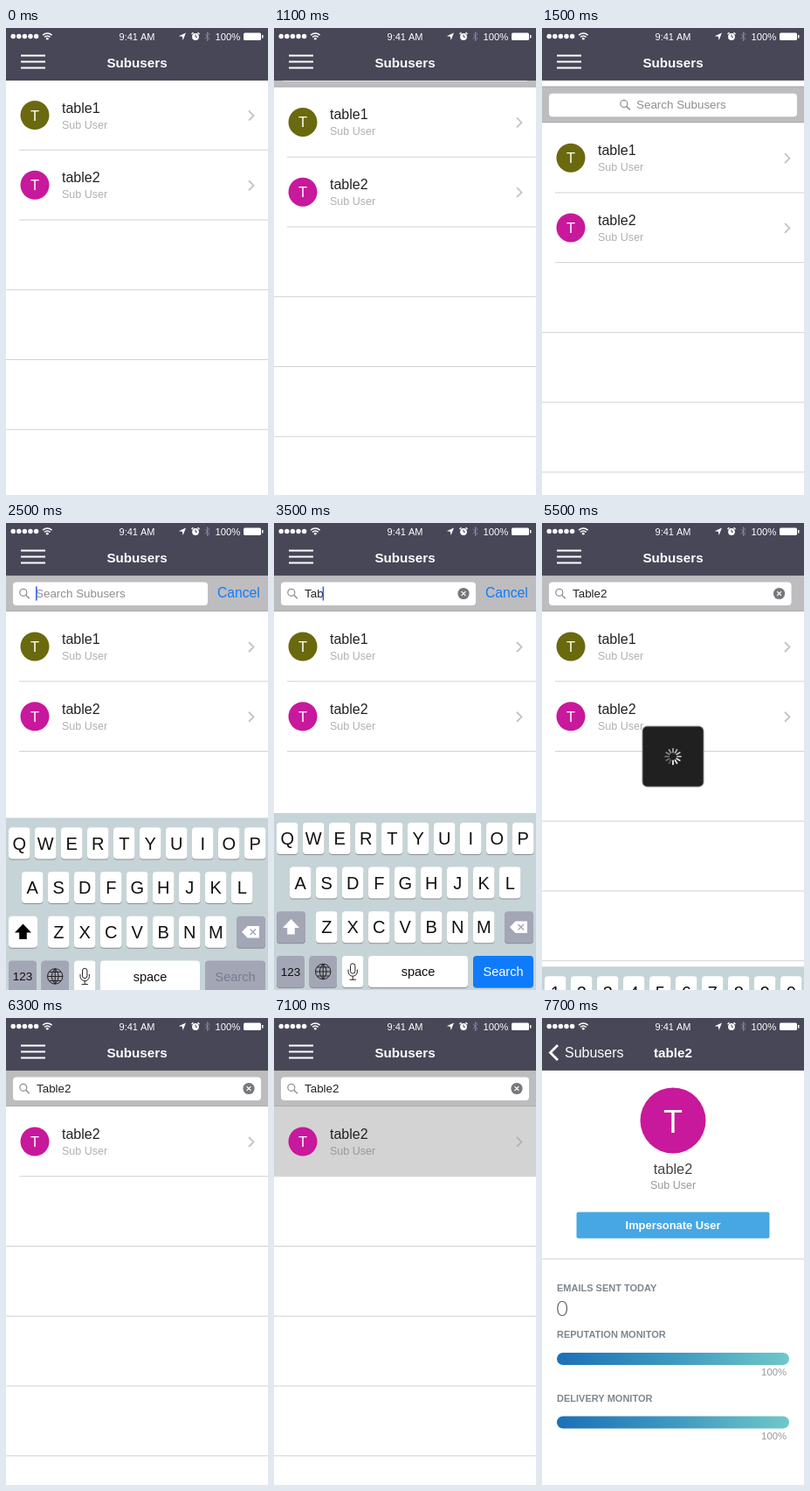
Recreate the animation shown at these times as an HTML page with a canvas. Size 300 px wide and 533 px high, loop 8000 ms.

```html
<!DOCTYPE html>
<html lang="en">
<head>
<meta charset="utf-8">
<title>Subuser search</title>
<style>
html, body { margin: 0; width: 100%; height: 100%; overflow: hidden; background: #fff; }
canvas { display: block; width: 300px; height: 533px; }
</style>
</head>
<body>
<canvas id="stage"></canvas>
<script>
const W = 300, H = 533, LOOP = 8000;
const NAV_H = 59.5, BAR_H = 41.5, ROW_H = 79.75;
const SANS = '"Liberation Sans", Arial, sans-serif';
const NAV = '#474758', BLUE = '#0f7bfb', PINK = '#c8189c', OLIVE = '#6a690e';
const GREY_KEY = '#a3a6b5', MUTED = '#8e8e93';
const USERS = [
  { name: 'table1', color: OLIVE },
  { name: 'table2', color: PINK }
];
const QUERY = 'Table2';
const PRESSES = [['T', 2900], ['A', 3100], ['B', 3300], ['L', 3600], ['E', 3900], ['2', 4650]]
  .map(([key, at]) => ({ key, at, end: at + (key === '2' ? 140 : 100) }));
const LETTERS = ['QWERTYUIOP', 'ASDFGHJKL', 'ZXCVBNM'];
const SYMBOLS = ['1234567890', '-/:;()$&@”', '.,?!’'];

const canvas = document.getElementById('stage');
const c = canvas.getContext('2d');
const ratio = window.devicePixelRatio || 1;
canvas.width = W * ratio;
canvas.height = H * ratio;

const progress = (t, start, length) => Math.min(1, Math.max(0, (t - start) / length));
const easeOut = x => 1 - (1 - x) ** 3;
const smooth = x => x * x * (3 - 2 * x);
const mix = (a, b, x) => a + (b - a) * x;

function text(str, x, y, size, color, align = 'left', weight = 'normal', family = SANS) {
  c.font = `${weight} ${size}px ${family}`;
  c.fillStyle = color;
  c.textAlign = align;
  c.fillText(str, x, y);
}
function rect(x, y, w, h, color) {
  c.fillStyle = color;
  c.fillRect(x, y, w, h);
}
function round(x, y, w, h, r, color) {
  c.beginPath();
  c.roundRect(x, y, w, h, r);
  c.fillStyle = color;
  c.fill();
}
function disc(x, y, r, color) {
  c.beginPath();
  c.arc(x, y, r, 0, 7);
  c.fillStyle = color;
  c.fill();
}
function stroke(path, color, width, cap = 'butt') {
  c.strokeStyle = color;
  c.lineWidth = width;
  c.lineCap = cap;
  c.stroke(new Path2D(path));
}
function group(x, y, alpha, draw) {
  c.save();
  c.translate(x, y);
  c.globalAlpha *= alpha;
  draw();
  c.restore();
}

function statusBar() {
  for (let i = 0; i < 5; i++) disc(8.2 + i * 6.6, 9.5, 2.7, '#fff');
  stroke('M42 8.2Q47.3 3.8 52.6 8.2M44 10.3Q47.3 7.6 50.6 10.3', '#fff', 1.5);
  disc(47.3, 12.2, 1.4, '#fff');
  text('9:41 AM', 150, 13.5, 11, '#fff', 'center');
  c.fillStyle = '#fff';
  c.fill(new Path2D('M206 5.5L202.6 14L201.8 9.8L197.8 9.2Z'));
  disc(217, 10, 3.9, '#fff');
  stroke('M217 7.5V10.2H219', NAV, 1);
  stroke('M212.5 7L214.5 5.2M221.5 7L219.5 5.2', '#fff', 1.4);
  stroke('M227.8 7L233 12.2L230.5 14.7V4.7L233 7.2L227.8 12.4', '#85859a', 1);
  text('100%', 239.5, 13.5, 11.3, '#fff');
  round(272, 5.5, 20, 8.5, 1.5, '#fff');
  rect(293, 8, 1.5, 3.5, '#fff');
}

function navBar(push) {
  rect(0, 0, W, NAV_H, NAV);
  rect(0, NAV_H - 0.5, W, 0.7, '#34343f');
  statusBar();
  group(0, 0, 1 - push, () => {
    for (const y of [31.5, 38.5, 45.5]) rect(17, y - 1, 28, 2, '#fff');
    text('Subusers', 150 - 90 * push, 45, 15.2, '#fff', 'center', 'bold');
  });
  group(0, 0, push, () => {
    stroke('M18 31L9.5 39.5L18 48', '#fff', 2.8);
    text('Subusers', mix(116, 26, push), 45, 16, '#fff');
    text(USERS[1].name, mix(270, 150, push), 45, 15.2, '#fff', 'center', 'bold');
  });
}

function userRow(user, y, selected) {
  if (selected) rect(0, y, W, ROW_H, '#d3d3d3');
  disc(33, y + 40, 16.5, user.color);
  text('T', 33, y + 46, 16.5, '#fff', 'center');
  text(user.name, 64, y + 37, 16, '#222');
  text('Sub User', 64, y + 55, 12.5, selected ? '#999' : '#b0b0b0');
  group(0, y, 1, () => stroke('M278 35L283.5 40.5L278 46', selected ? '#b4b4b8' : '#c3c3c8', 1.8));
}

function list(users, top, selected) {
  users.forEach((user, i) => userRow(user, top + i * ROW_H, selected));
  for (let i = 1; i < 7; i++) {
    const x = i <= users.length && !selected ? 15 : 0;
    rect(x, top + i * ROW_H - 0.5, W - x, 1, '#d2d2d4');
  }
}

function searchBar(t, y) {
  const enter = easeOut(progress(t, 2200, 300));
  const leave = easeOut(progress(t, 5290, 400));
  const active = enter * (1 - leave);
  const right = mix(292, 231, active);
  const typed = QUERY.slice(0, PRESSES.filter(p => t >= p.end).length);
  const shift = mix(74, 0, enter);

  rect(0, y, W, BAR_H, '#bdbdc0');
  rect(0, y, W, 1, '#adadb1');
  rect(0, y + BAR_H - 1, W, 1, '#adadb1');
  round(8, y + 8, right - 8, 26.5, 4, '#fff');
  group(shift, y, 1, () => {
    c.beginPath();
    c.arc(19.8, 19.8, 4, 0, 7);
    c.strokeStyle = MUTED;
    c.lineWidth = 1.2;
    c.stroke();
    stroke('M22.7 22.7L26.8 26.8', MUTED, 1.5);
    if (typed) text(typed, 35, 25.5, 13.4, '#222');
    else text('Search Subusers', 34, 25.5, 13.4, MUTED);
  });
  if (t > 2400 && t < 5290) {
    c.font = `13.4px ${SANS}`;
    rect(34 + c.measureText(typed).width, y + 13, 1.6, 16, '#3a63e8');
  }
  if (typed) {
    disc(right - 14, y + 21, 6.6, '#77777c');
    group(right - 14, y + 21, 1, () => stroke('M-2.4 -2.4L2.4 2.4M2.4 -2.4L-2.4 2.4', '#fff', 1.3));
  }
  if (active > 0) {
    group(80 * (1 - active), y, active, () => text('Cancel', 242, 25, 15.7, BLUE));
  }
}

function keyCap(x, y, w, color = '#fff') {
  round(x, y + 1, w, 36, 4, '#888d94');
  round(x, y, w, 36, 4, color);
}
function labelKey(label, x, y, w, size, color, ink = '#111') {
  keyCap(x, y, w, color);
  text(label, x + w / 2, y + 18 + size * 0.36, size, ink, 'center');
}

function popup(label, x, y) {
  const shape = new Path2D(`M${x - 17} ${y - 60}h34q8 0 8 8v28c0 12 -13 14 -13 26v30q0 4 -4 4h-16
    q-4 0 -4 -4v-30c0 -12 -13 -14 -13 -26v-28q0 -8 8 -8z`);
  c.save();
  c.shadowColor = 'rgba(0,0,0,.4)';
  c.shadowBlur = 3 * ratio;
  c.fillStyle = '#fff';
  c.fill(shape);
  c.restore();
  text(label, x, y - 21, 31, '#111', 'center');
}

function keyboard(t) {
  const rise = easeOut(progress(t, 2200, 430)) * (1 - easeOut(progress(t, 5290, 430)));
  if (!rise) return;
  const numeric = t >= 4200;
  const hasText = t >= PRESSES[0].end;
  const pressed = PRESSES.find(p => t >= p.at && t < p.end);
  const rows = numeric ? SYMBOLS : LETTERS;
  let pop = null;

  group(0, H - 202 * rise, 1, () => {
    rect(0, 0, W, 203, '#c6d4d7');
    rows.forEach((row, r) => {
      const wide = numeric && r === 2;
      const pitch = wide ? 42 : 30, width = wide ? 36 : 24.5;
      const left = r === 2 ? 48 : row.length === 9 ? 18 : 3;
      const y = 11 + r * 50.6;
      [...row].forEach((label, i) => {
        const x = left + i * pitch;
        labelKey(label, x, y, width, 20);
        if (pressed && pressed.key === label) pop = [label, x + width / 2, y];
      });
    });

    const y3 = 112.2, y4 = 163;
    if (numeric) labelKey('#+=', 3, y3, 33, 12, GREY_KEY);
    else {
      keyCap(3, y3, 33, hasText ? GREY_KEY : '#fff');
      c.fillStyle = hasText ? '#fff' : '#000';
      c.fill(new Path2D('M19.5 121L29 131H23.8V138.5H15.2V131H10Z'));
    }
    keyCap(264, y3, 33, GREY_KEY);
    c.fillStyle = '#fff';
    c.fill(new Path2D('M270 130.2L276.5 123.5H290V137H276.5Z'));
    stroke('M279.5 127L286 133.5M286 127L279.5 133.5', GREY_KEY, 1.4);

    labelKey(numeric ? 'ABC' : '123', 3, y4, 32, 13.5, GREY_KEY);
    keyCap(40.5, y4, 31.5, GREY_KEY);
    stroke('M47.5 181a8.7 8.7 0 1 0 17.4 0a8.7 8.7 0 1 0 -17.4 0H65M56.2 172.3V189.7M56.2 172.3q-8 8.7 0 17.4' +
      'q8 -8.7 0 -17.4M49.5 176h13.4M49.5 186h13.4', '#222', 1);
    keyCap(78, y4, 24.5);
    stroke('M87.5 174.5a2.7 2.7 0 0 1 5.4 0v6a2.7 2.7 0 0 1 -5.4 0zM85 178.5v2.5a5.2 5.2 0 0 0 10.4 0v-2.5' +
      'M90.2 186.2v4M86.5 190.2h7.4', '#222', 1);
    labelKey('space', 108, y4, 114, 14.5);
    const tapped = t >= 4950 && t < 5100;
    labelKey('Search', 228, y4, 69, 14.5,
      tapped ? '#fff' : hasText ? BLUE : GREY_KEY,
      tapped ? '#111' : hasText ? '#fff' : '#777b8a');
    if (pop) popup(...pop);
  });
}

function spinner(t) {
  const alpha = progress(t, 5100, 200) * (t < 5780 ? 1 : 0);
  if (!alpha) return;
  group(150, 266.5, alpha, () => {
    round(-35.5, -35, 71, 70, 6, '#8a8a8a');
    round(-34.5, -34, 69, 68, 5, '#202021');
    const step = Math.floor(t / 1000 * 12);
    for (let i = 0; i < 12; i++) {
      const age = (((step - i) % 12) + 12) % 12;
      c.save();
      c.rotate(i * Math.PI / 6);
      stroke('M0 -4.8V-9', `rgba(255,255,255,${1 - age * 0.065})`, 1.7, 'round');
      c.restore();
    }
  });
}

function listScreen(t) {
  const scroll = t < 1400
    ? 50 * smooth(progress(t, 1000, 400))
    : mix(50, BAR_H, smooth(progress(t, 1400, 400)));
  const top = NAV_H + scroll;
  rect(0, 0, W, H, '#fff');
  list(t < 5780 ? USERS : [USERS[1]], top, t >= 7050);
  searchBar(t, top - BAR_H);
  spinner(t);
  keyboard(t);
}

function monitor(title, y) {
  text(title, 17, y, 11, '#7c8791', 'left', 'bold');
  const fill = c.createLinearGradient(17, 0, 283, 0);
  fill.addColorStop(0, '#1c70b7');
  fill.addColorStop(0.5, '#3f98c0');
  fill.addColorStop(1, '#70c8c8');
  round(17, y + 17, 266, 14, 7, fill);
  text('100%', 280, y + 43, 11.3, '#999', 'right');
}

function detailScreen() {
  rect(0, 0, W, H, '#fff');
  disc(150, 117, 37.5, PINK);
  text('T', 150, 130.5, 36, '#fff', 'center');
  text(USERS[1].name, 150, 178, 16.3, '#444', 'center');
  text('Sub User', 150, 195, 12.5, '#999', 'center');
  round(39.5, 221.5, 221, 30, 2, '#46a7e3');
  text('Impersonate User', 150, 241, 12.9, '#fff', 'center', 'bold');
  rect(0, 274.5, W, 1, '#d0d0d2');
  text('EMAILS SENT TODAY', 17, 312, 11, '#7c8791', 'left', 'bold');
  text('0', 16.5, 340, 23, '#555', 'left', 300, 'Lato, "Open Sans", sans-serif');
  monitor('REPUTATION MONITOR', 365);
  monitor('DELIVERY MONITOR', 437.5);
}

function draw() {
  const t = performance.now() % LOOP;
  const push = easeOut(progress(t, 7150, 500));
  c.setTransform(ratio, 0, 0, ratio, 0, 0);
  group(-90 * push, 0, 1, () => listScreen(t));
  if (push) {
    rect(0, 0, W, H, `rgba(0,0,0,${0.1 * push})`);
    group(W * (1 - push), 0, 1, detailScreen);
  }
  navBar(push);
  requestAnimationFrame(draw);
}
draw();
</script>
</body>
</html>
```
